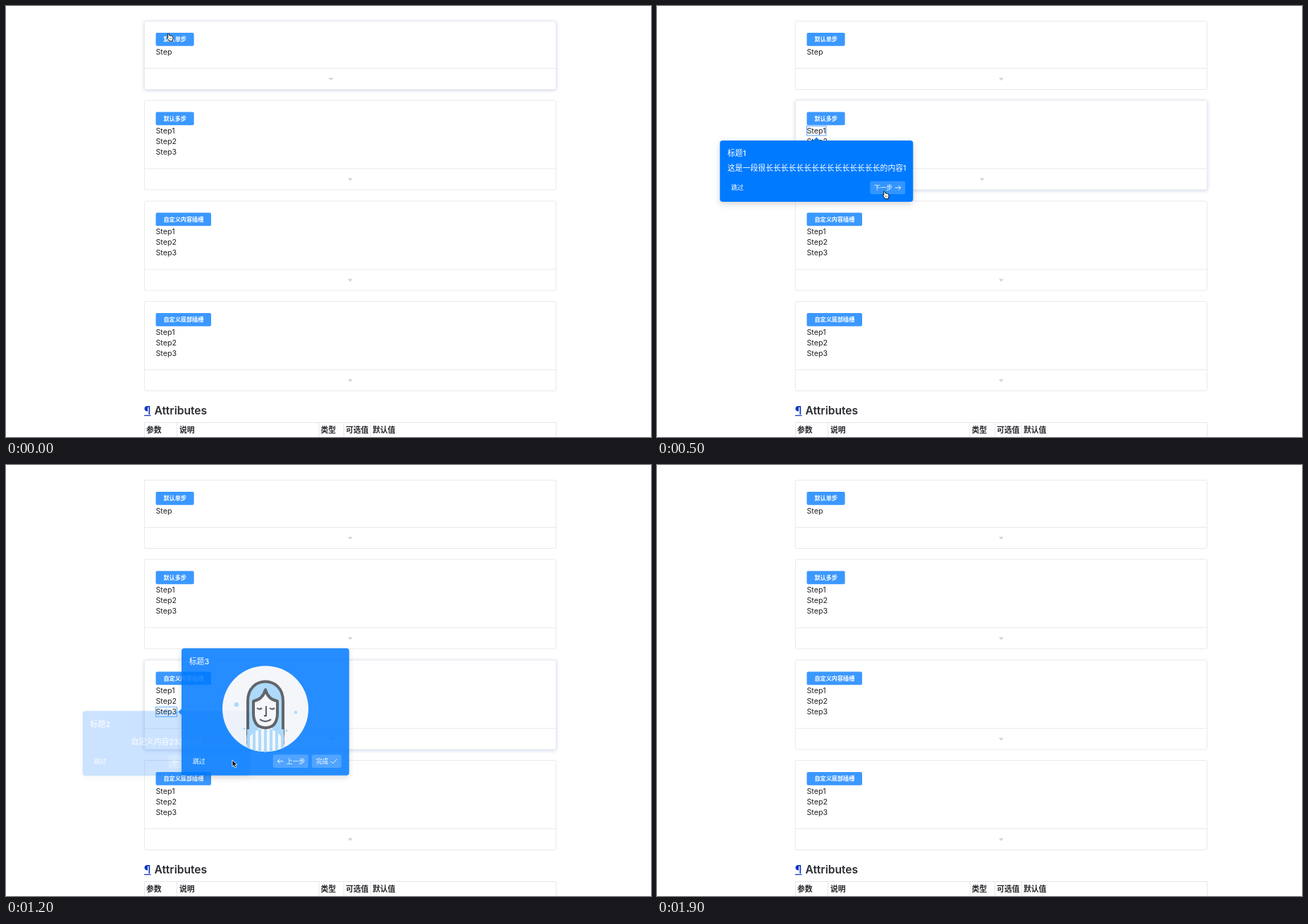
These frames come from a looping animation (915 by 612 pixels, 2 s). An HTML page:

```html
<!DOCTYPE html>
<html lang="zh">
<head>
<meta charset="utf-8">
<title>Guide popovers</title>
<style>
html, body { margin: 0; width: 100%; height: 100%; overflow: hidden; background: #fff; }
svg { display: block; width: 915px; height: 612px; font-family: Inter, "Noto Sans CJK SC", "Noto Sans CJK", sans-serif; }
.on { filter: drop-shadow(0 1px 2.5px #cfd6ee); }
.pop { filter: drop-shadow(0 3px 4px rgba(0, 0, 0, .17)); }
</style>
</head>
<body>
<svg id="stage" viewBox="0 0 915 612"></svg>
<script>
const stage = document.getElementById('stage');
const STEP = 100, COUNT = 20, LEFT = 212.5;
const LONG = '这是一段很' + '长'.repeat(15) + '的内容';

const cards = [
  { y: 21.5, h: 97, label: '默认单步', steps: ['Step'] },
  { y: 134, h: 127, label: '默认多步', steps: ['Step1', 'Step2', 'Step3'] },
  { y: 277, h: 127, label: '自定义内容插槽', steps: ['Step1', 'Step2', 'Step3'] },
  { y: 419.5, h: 127, label: '自定义底部插槽', steps: ['Step1', 'Step2', 'Step3'] }
];

const text = (x, y, s, size, fill = '#fff', weight = 400, anchor = 'start') =>
  `<text x="${x}" y="${y}" font-size="${size}" fill="${fill}" font-weight="${weight}" text-anchor="${anchor}">${s}</text>`;
const rect = (x, y, w, h, fill, r = 0, more = '') =>
  `<rect x="${x}" y="${y}" width="${w}" height="${h}" rx="${r}" fill="${fill}" ${more}/>`;
const line = (d, stroke, w = 1) =>
  `<path d="${d}" fill="none" stroke="${stroke}" stroke-width="${w}"/>`;

const stepY = (c, s) => cards[c].y + 43 + 15.2 * s;
const stepW = (c, s) => c === 0 ? 23.5 : s === 0 ? 27.5 : 30;

function card(i, { hover, lit, tri = {} }) {
  const { y, h, label, steps } = cards[i];
  const on = hover === i, end = y + h;
  const tx = tri[i] || (on ? 461 : 488.3), ty = end - 14.5;
  return rect(196.3, y, 584, h, '#fff', 2, `stroke="#e9e9eb" ${on ? 'class="on"' : ''}`) +
    line(`M196.5 ${end - 30}H780`, '#e9e9eb') +
    `<path d="M${tx - 3.5} ${ty - 2}h7l-3.5 4z" fill="#d2d5da"/>` +
    rect(LEFT, y + 16.5, label.length * 8.13 + 21.6, 18.8, lit === i ? '#61adff' : '#3b98ff', 2) +
    text(223.4, y + 28.7, label, 8.13, '#fff', 700) +
    steps.map((s, n) => text(LEFT, stepY(i, n) + 4, s, 10.7, '#222326')).join('');
}

function docs() {
  const heads = [[199, '参数'], [246, '说明'], [446.5, '类型'], [482, '可选值'], [520, '默认值']];
  return text(195.8, 579.5, '¶', 16, '#1238c4', 600) + line('M196 581.5h9.5', '#1238c4', 1.3) +
    text(210.5, 579.6, 'Attributes', 15.6, '#2a2c31', 600) +
    line('M196.5 612V591.5H780.5V612M242.5 591.5V612M444 591.5V612M479.3 591.5V612M517.3 591.5V612', '#e6e7eb') +
    heads.map(([x, s]) => text(x, 606, s, 10.8, '#25272b', 700)).join('');
}

const arrowIcon = (x, y, dir) =>
  line(`M${x - 4 * dir} ${y}h${8 * dir}m${-3.2 * dir} -3.2l${3.2 * dir} 3.2l${-3.2 * dir} 3.2`, '#fff', .9);
const pad = (x, y, w) => rect(x, y - 9.3, w, 18.6, '#fff', 2.5, 'fill-opacity=".2"');
const small = (x, y, s) => text(x, y + 3.2, s, 8.8, '#fff', 500);

const prev = (x, y) => pad(x, y, 50) + arrowIcon(x + 10.5, y, -1) + small(x + 19, y, '上一步');
const next = (x, y) => pad(x, y, 50) + small(x + 5.5, y, '下一步') + arrowIcon(x + 39.5, y, 1);
const done = (x, y) => pad(x, y, 42) + small(x + 6, y, '完成') + line(`M${x + 27} ${y}l3 3l5.5 -6`, '#fff', .9);

function avatar(cx, cy) {
  const ink = 'stroke="#484b51" stroke-width="4" stroke-linejoin="round"';
  let stripes = '';
  for (let x = -24; x <= 24; x += 8) stripes += `M${x} 29V64`;
  return `<g transform="translate(${cx} ${cy})"><clipPath id="disc"><circle r="61"/></clipPath>
    <circle r="61" fill="#f3f5fa"/><g clip-path="url(#disc)">
    <path d="M-28 64Q-23 50 -25 36V-11C-25 -48 25 -48 25 -11V36Q23 50 28 64z" fill="#9fd4fb" ${ink}/>
    <path d="M-28 64Q-28 36 -10 30V20H10V30Q28 36 28 64z" fill="#f3f5fa"/>
    ${line(stripes, '#9fd4fb', 4)}
    <path d="M-17 -11V8Q-16 27 0 27Q16 27 17 8V-11Q4 -13 0 -27Q-4 -13 -17 -11z" fill="#f3f5fa" ${ink}/>
    <path d="M-12 -1q4 3 7 0M6 -1q4 3 7 0M1 -4v14h-3M-8 15q8 6 16 0" fill="none" stroke="#484b51" stroke-width="2.2"/>
    </g><g fill="#9fd4fb"><circle cx="-41" cy="-6" r="3.2"/><circle cx="43" cy="5" r="2.2"/>
    <circle cx="30" cy="31" r="1.5"/><circle cx="-30" cy="28" r="1.5"/></g></g>`;
}

function brand(x, y) {
  return `<circle cx="${x + 34.5}" cy="${y + 52.5}" r="25" fill="#409cff"/>` +
    text(x + 67, y + 68, 'Tavoret', 39, '#409cff', 600);
}

// Size and body of the popover for each card and step.
function content(c, s) {
  if (c === 2) return [
    [237.5, 112.5, brand],
    [237.5, 92, (x, y) => text(x + 118.8, y + 48, '自定义内容2333333', 10.8, '#fff', 400, 'middle')],
    [237.8, 180.5, (x, y) => avatar(x + 119, y + 86)]
  ][s];
  const n = c ? s + 1 : '';
  return [c ? 274 : 270, c === 3 ? 106 : 87, (x, y) => text(x + 10.8, y + 43, LONG + n, 10.83)];
}

function footer(c, s, x, y, w, h) {
  const by = y + h - 20, r = x + w - 11;
  if (c === 0) return small(x + 169, by, '了解更多') + pad(r - 46, by, 46) + small(r - 41, by, '我知道了');
  if (c === 3) {
    const mid = x + w / 2;
    return text(mid, y + 69.6, 'Skip', 8.3, '#fff', 500, 'middle') + pad(mid - 19.3, y + 85.5, 38.6) +
      text(mid, y + 88.6, s < 2 ? 'Next' : 'Done', 8.3, '#fff', 500, 'middle');
  }
  const last = s === 2 ? 42 : 50;
  return small(x + 16, by, '跳过') + (s ? prev(r - last - 55, by) : '') +
    (s === 2 ? done : next)(r - last, by);
}

function pop([c, s, alpha = 1]) {
  const [w, h, body] = content(c, s);
  const ay = stepY(c, s), aw = stepW(c, s), mid = LEFT + aw / 2, side = s === 2;
  const x = side ? 249 : mid - w / 2, y = side ? ay - h / 2 : ay + 14;
  const tip = side ? `M249.5 ${ay - 5}l-5 5l5 5z` : `M${mid - 5} ${y + .5}l5 -5l5 5z`;
  const mark = alpha > .5 ? rect(LEFT, ay - 6.7, aw, 13.6, 'none', 0, 'stroke="#4a9eff" stroke-width=".9"') : '';
  const title = '标题' + (c ? s + 1 : '');
  return mark + `<g opacity="${alpha}"><g class="pop">${rect(x, y, w, h, '#007aff', 4)}<path d="${tip}" fill="#007aff"/></g>` +
    text(x + 10.8, y + 22.4, title, 10.8, '#fff', 500) + body(x, y) + footer(c, s, x, y, w, h) + '</g>';
}

function cursor(kind, x, y) {
  const hand = `<path d="M-2.6 -4.7q1.2 -1 1.8 .5l.8 2.4q1 -.8 1.6 .2q1 -.6 1.6 .4q1.2 -.3 1.5 .9q.7 2.7 -.4 4.5v1.6h-4.6q-1.2 -2.6 -3.4 -4.6q-.2 -1.4 1.6 -.5z"
    fill="#fff" stroke="#111" stroke-width="1"/><path d="M.2 1.4l.5 2M2 1.2l.4 2" stroke="#111" stroke-width=".6"/>`;
  const arrow = `<path d="M0 0V9.3l2.2 -2l1.6 3.7l1.8 -.8l-1.6 -3.5h3z" fill="#111" stroke="#fff" stroke-width=".8"/>`;
  return `<g transform="translate(${x} ${y})">${kind === 'hand' ? hand : arrow}</g>`;
}

const hand = (x, y) => ['hand', x, y], arrow = (x, y) => ['arrow', x, y];

// One entry per 100 ms.
const scenes = [
  { hover: 0, at: hand(232, 44) },
  { hover: 0, lit: 0, pops: [[0, 0]], at: hand(232, 44) },
  { hover: 0, lit: 0, pops: [[0, 0]], at: hand(337, 152.5) },
  { hover: 1, lit: 1, at: hand(245, 161) },
  { hover: 1, lit: 1, pops: [[1, 0]], at: hand(245, 161) },
  { hover: 1, pops: [[1, 0]], at: hand(324, 268) },
  { hover: 1, pops: [[1, 1]], at: hand(330, 275) },
  { hover: 1, pops: [[1, 2]], at: arrow(330, 274) },
  { hover: 1, pops: [[1, 2]], at: hand(491, 233) },
  { hover: 1, lit: 2, at: arrow(284, 306) },
  { lit: 2, pops: [[2, 0]], at: arrow(282, 306) },
  { hover: 2, pops: [[2, 1]], at: arrow(320, 420) },
  { hover: 2, pops: [[2, 1, .2], [2, 2, .85]], at: arrow(321, 419) },
  { hover: 2, pops: [[2, 2]], at: hand(455, 423) },
  { hover: 2, lit: 3, pops: [[3, 0]], tri: { 3: 484.3 }, at: arrow(252.5, 439) },
  { hover: 3, pops: [[3, 0]], at: hand(228, 564) },
  { hover: 3, pops: [[3, 1]], at: hand(228, 578) },
  { hover: 3, pops: [[3, 2]], at: hand(386, 528) },
  { tri: { 3: 480 }, at: arrow(240, 157) },
  {}
];

function draw(scene) {
  stage.innerHTML = docs() + cards.map((_, i) => card(i, scene)).join('') +
    (scene.pops || []).map(pop).join('') + (scene.at ? cursor(...scene.at) : '');
}

let shown = -1;
const start = performance.now();
function tick() {
  const k = Math.floor((performance.now() - start) / STEP) % COUNT;
  if (k !== shown) draw(scenes[shown = k]);
  requestAnimationFrame(tick);
}
tick();
</script>
</body>
</html>
```
